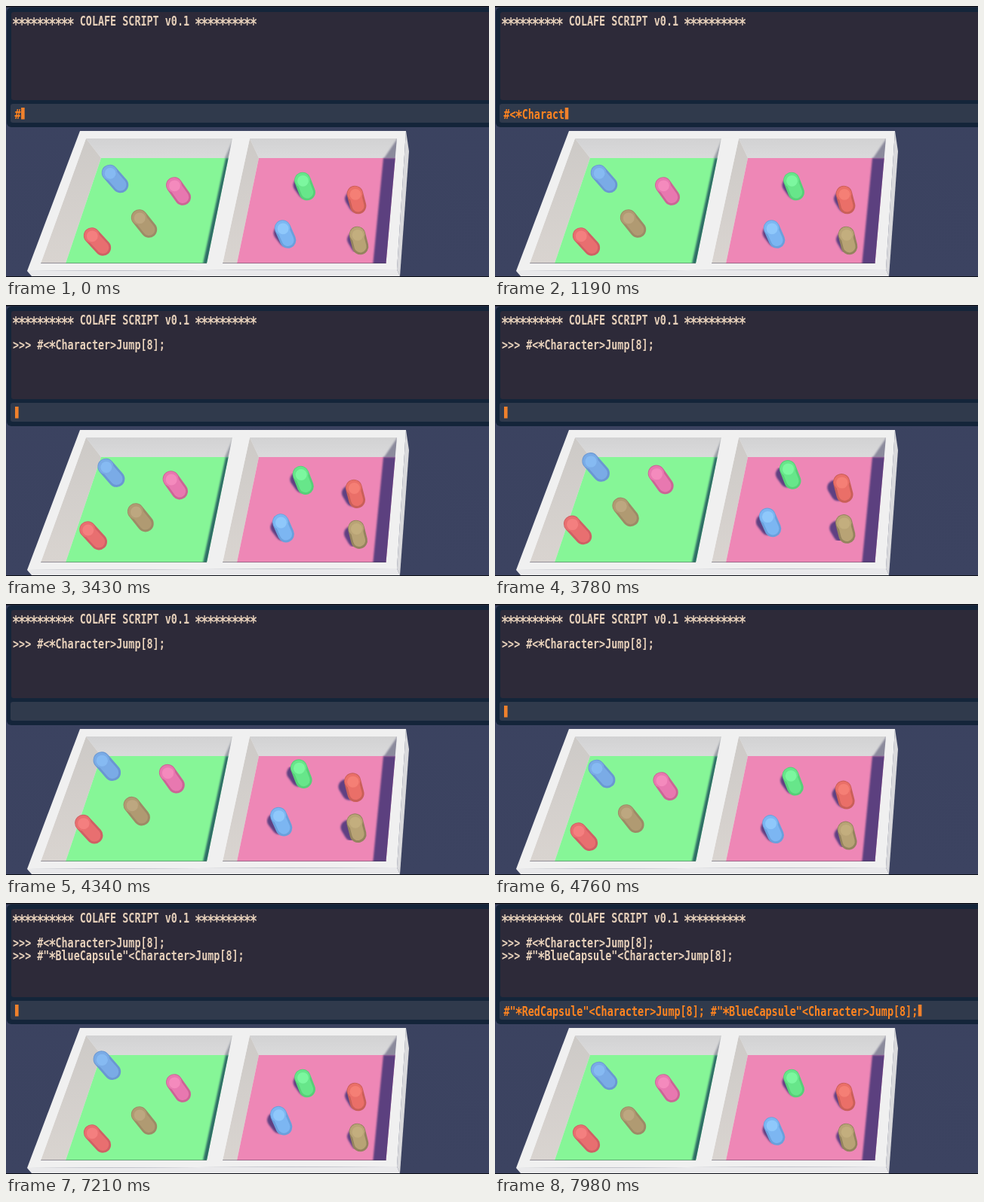
An HTML page that plays this animation: 640 px wide and 360 px high, repeating every 8 s.

```html
<!DOCTYPE html>
<html lang="en">
<head>
<meta charset="utf-8">
<title>Capsule script</title>
<style>
html, body { margin: 0; width: 100%; height: 100%; overflow: hidden; background: #3b4260; }
svg { display: block; width: 100vw; height: 100vh; }
text { font: bold 13.4px "DejaVu Sans Mono", "DejaVu Sans", monospace; text-anchor: middle; white-space: pre; }
.star { font-size: 17px; }
</style>
</head>
<body>
<svg id="stage" viewBox="0 0 640 360">
  <defs>
    <linearGradient id="sky" x2="0" y2="1">
      <stop stop-color="#3a425f"/><stop offset="1" stop-color="#3c4361"/>
    </linearGradient>
    <linearGradient id="wall" x2="0" y2="1">
      <stop stop-color="#d2d2d3"/><stop offset="1" stop-color="#dadadb"/>
    </linearGradient>
    <linearGradient id="side" x2="0" y2="1">
      <stop stop-color="#cdcac7"/><stop offset="1" stop-color="#d9d4d0"/>
    </linearGradient>
    <clipPath id="pinkFloor"><path d="M335 202H515L503.5 342H306Z"/></clipPath>
    <clipPath id="greenBox"><path d="M106 176H300L266 342H46Z"/></clipPath>
    <clipPath id="pinkBox"><path d="M323 176H518L503.5 342H287Z"/></clipPath>
    <filter id="soft"><feGaussianBlur stdDeviation="1.2"/></filter>
  </defs>
  <rect width="640" height="360" fill="url(#sky)"/>

  <g id="console">
    <rect width="640" height="1.5" fill="#0b0e16"/>
    <rect x="1" y="2" width="650" height="159" rx="6" fill="#14253a"/>
    <rect x="7" y="8" width="650" height="117" rx="3" fill="#2d2a39"/>
    <rect x="6" y="130" width="650" height="25" rx="3" fill="#303a4c"/>
  </g>

  <g id="tray">
    <path d="M530 166L534 193L522 359L518 350Z" fill="#d9d9dc"/>
    <path d="M28 352L518 350L522 359H34Z" fill="#e9e9eb"/>
    <path d="M98 166H530L518 350L28 352Z" fill="#f0f0f0"/>

    <g clip-path="url(#greenBox)">
      <path d="M106 176H300L294 202H126Z" fill="url(#wall)"/>
      <path d="M106 176L126 202L79 342H46Z" fill="url(#side)"/>
      <path d="M126 202H296L268 342H79Z" fill="#86f697"/>
      <path d="M302 174L296 202H290Z" fill="#9a9da5" filter="url(#soft)"/>
      <path d="M291 202H300L270 342H261Z" fill="#2f6d66" filter="url(#soft)"/>
      <path d="M46 342H266" stroke="#3c3c50" stroke-opacity=".45" stroke-width="2"/>
    </g>

    <g clip-path="url(#pinkBox)">
      <path d="M323 176H518L515 202H335Z" fill="url(#wall)"/>
      <path d="M323 176L335 202L306 342H287Z" fill="url(#side)"/>
      <path d="M335 202H518L506 342H306Z" fill="#ee87b6"/>
      <path d="M520 174L517 202H501Z" fill="#8b8a9c" filter="url(#soft)"/>
      <path d="M500 202H520L508 345H486Z" fill="#5c3f7f" filter="url(#soft)"/>
      <path d="M287 342H504" stroke="#3c3c50" stroke-opacity=".45" stroke-width="2"/>
    </g>
    <rect y="359" width="640" height="1" fill="#0b0e16"/>
  </g>

  <g clip-path="url(#pinkFloor)">
    <g id="shadows" filter="url(#soft)" stroke="#5f4182" stroke-width="19" stroke-linecap="round"></g>
  </g>
  <g id="capsules" stroke-linecap="round"></g>
  <g id="lines"></g>
  <rect id="caret" y="135" width="4.6" height="15.5" fill="#f0812c"/>
</svg>

<script>
const LOOP = 8000, STEP = 70, PITCH = 8.07;
const BLINK = 588;
const SPEED = 8, GRAVITY = 9.8;
const ENTER_1 = 3220, PASTE_2 = 4970, ENTER_2 = 6090, PASTE_3 = 7770;

const blueJump = '#"*BlueCapsule"<Character>Jump[8];';
const redJump = '#"*RedCapsule"<Character>Jump[8];';
const allJump = '#<*Character>Jump[8];';
const stars = '*'.repeat(10);

const $ = id => document.getElementById(id);

function add(parent, tag, attrs) {
  const node = document.createElementNS('http://www.w3.org/2000/svg', tag);
  set(node, attrs);
  return parent.appendChild(node);
}

function set(node, attrs) {
  for (const key in attrs) node.setAttribute(key, attrs[key]);
}

// One tall line of console text on a fixed character grid.
function addLine(left, baseline, fill) {
  const node = add($('lines'), 'text', { fill, transform: `translate(${left} ${baseline}) scale(1 1.38)` });
  let shown = '';
  return content => {
    if (content === shown) return;
    shown = content;
    node.replaceChildren();
    [...content].forEach((char, i) => {
      const isStar = char === '*';
      const cell = add(node, 'tspan', { x: (i + 0.5) * PITCH, y: isStar ? 4 : 0, class: isStar ? 'star' : '' });
      cell.textContent = char;
    });
  };
}

const cream = '#e6d0ba', orange = '#ff8420';
const title = addLine(9, 26, cream);
const history1 = addLine(9, 58.5, cream);
const history2 = addLine(9, 75.5, cream);
const input = addLine(11.5, 149.5, orange);
title(`${stars} COLAFE SCRIPT v0.1 ${stars}`);

function addCapsule(x, y, [edge, body, top], isBlue) {
  const lean = (600 - x) * 0.0153;
  const group = add($('capsules'), 'g', {});
  const axis = { x1: -lean, y1: -8, x2: lean, y2: 8 };
  add(group, 'line', { ...axis, stroke: edge, 'stroke-width': 21.6 });
  add(group, 'line', { ...axis, stroke: body, 'stroke-width': 16 });
  add(group, 'circle', { cx: -lean, cy: -8, r: 10, fill: body });
  add(group, 'circle', { cx: -lean + 0.6, cy: -7.2, r: 7.4, fill: top });
  const shadow = x > 300 && add($('shadows'), 'line', { x1: x + lean - 3, y1: y + 7, x2: x - 6, y2: y - 1.5 });
  return { x, y, group, shadow, isBlue };
}

const capsules = [
  addCapsule(144.5, 229.5, ['#6a97d2', '#7aabe6', '#86baf2'], true),
  addCapsule(228.5, 246, ['#cb6595', '#e878b0', '#f48abd']),
  addCapsule(183, 289, ['#9d8a66', '#b09a72', '#bda780']),
  addCapsule(121, 313, ['#cf6064', '#e86f70', '#f47f7f']),
  addCapsule(396, 239.5, ['#57cf78', '#67e68a', '#7cf79f']),
  addCapsule(464.5, 257.5, ['#c95f58', '#ea6f68', '#f57f75']),
  addCapsule(370, 303, ['#6aa0dc', '#7cb6f2', '#8fc8fb'], true),
  addCapsule(467.5, 311.5, ['#94835e', '#b8a375', '#c3ae7e'])
];

function jumpHeight(ms) {
  const s = ms / 1000;
  return s < 0 ? 0 : Math.max(0, SPEED * s - GRAVITY / 2 * s * s);
}

function poseCapsule({ x, y, group, shadow, isBlue }, t) {
  const h = jumpHeight(t - ENTER_1 - 15) + (isBlue ? jumpHeight(t - ENTER_2 - 10) : 0);
  const px = x + (x - 600) * 0.0082 * h, py = y - 4.85 * h;
  set(group, { transform: `translate(${px} ${py}) scale(${1 + 0.01 * h})` });
  if (shadow) set(shadow, { transform: `translate(${-3 * h} ${-4.7 * h})` });
}

function typedCount(t) {
  return t < 2310
    ? 1 + Math.floor((t + 70) / 140)
    : Math.min(21, Math.max(17, 18 + Math.floor((t - 2380) / 210)));
}

function inputAt(t) {
  if (t < ENTER_1) return { content: allJump.slice(0, typedCount(t)), since: t };
  if (t < PASTE_2) return { content: '', since: ENTER_1 };
  if (t < ENTER_2) return { content: blueJump, since: PASTE_2 };
  if (t < PASTE_3) return { content: '', since: ENTER_2 - STEP };
  return { content: `${redJump} ${blueJump}`, since: PASTE_3 };
}

function render(ms) {
  const t = Math.floor((ms % LOOP) / STEP) * STEP;
  const { content, since } = inputAt(t);
  input(content);
  history1(t >= ENTER_1 ? '>>> ' + allJump : '');
  history2(t >= ENTER_2 ? '>>> ' + blueJump : '');
  const caretOn = Math.floor((t - since) / BLINK) % 2 === 0;
  set($('caret'), { x: 12 + content.length * PITCH, opacity: caretOn ? 1 : 0 });
  capsules.forEach(capsule => poseCapsule(capsule, t));
}

const start = performance.now();
function tick() {
  render(performance.now() - start);
  requestAnimationFrame(tick);
}
tick();
</script>
</body>
</html>
```
